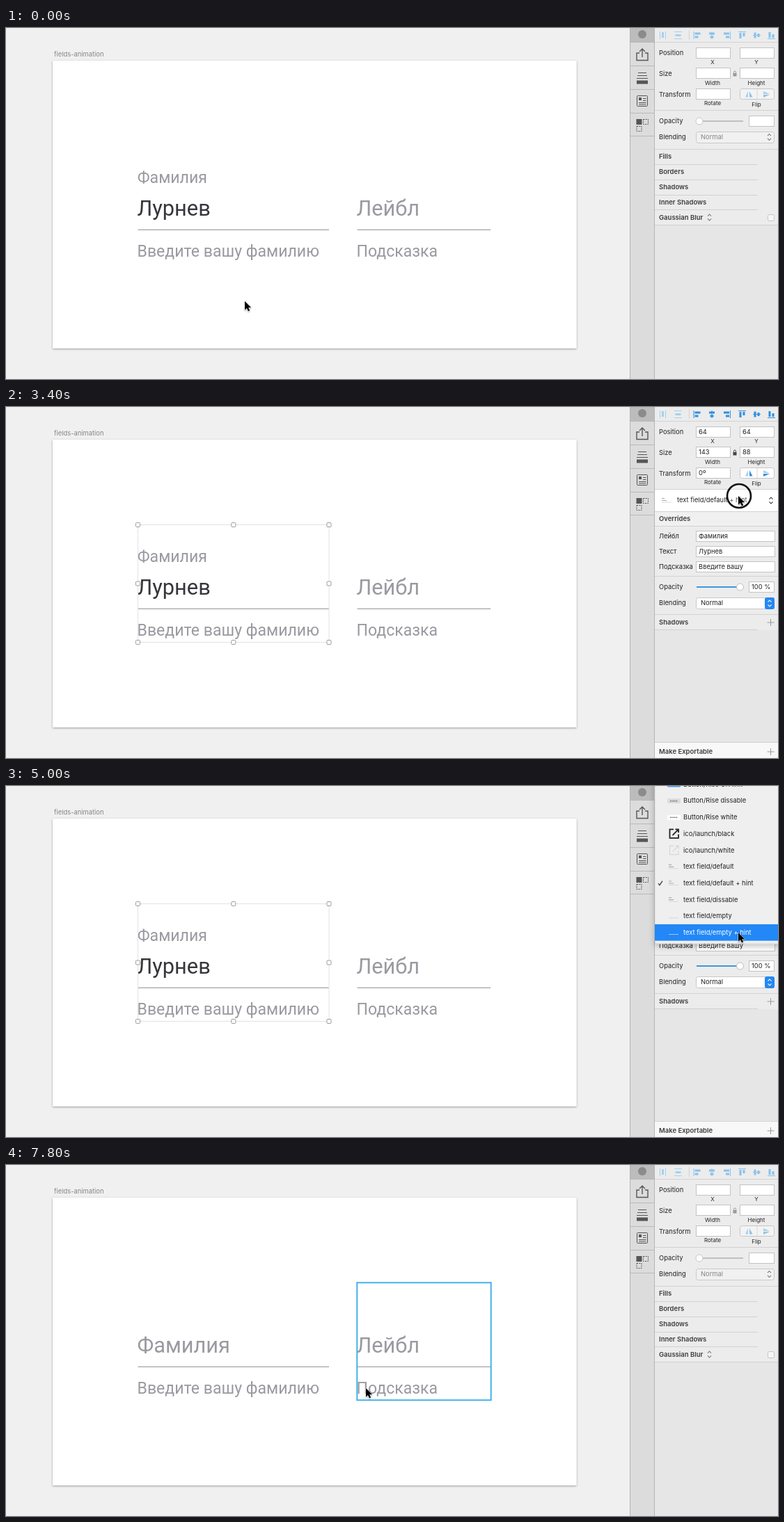
These frames come from a looping animation (1109 px wide and 505 px high, 8800 ms). An HTML page:

```html
<!DOCTYPE html>
<html lang="ru">
<head>
<meta charset="utf-8">
<title>Fields animation</title>
<style>
  html, body { margin: 0; width: 100%; height: 100%; overflow: hidden; background: #f0f0f0; }
  svg { display: block; width: 1109px; height: 505px; }
  text { font-family: Inter, sans-serif; font-size: 9.4px; fill: #222; white-space: pre; }
  .bold { font-weight: 600; font-size: 9.5px; fill: #3c3c3c; }
  .small { font-size: 8px; text-anchor: middle; }
  .field { font-family: Roboto, sans-serif; font-size: 23.08px; fill: #9b99a0; }
  .big { font-size: 30.77px; }
  .dark { fill: #37353b; }
  .white { fill: #fff; }
  .dim { fill: #858585; }
  .state { display: none; }
</style>
</head>
<body>
<svg id="stage" viewBox="0 0 1109 505"></svg>
<script>
const LOOP = 8800;
const SURNAME = 'Лурнев';
const BLUE = '#2f8fe0', PALE = '#a5d1ee';

const rect = (x, y, w, h, fill, stroke = 'none', extra = '') =>
  `<rect x="${x}" y="${y}" width="${w}" height="${h}" fill="${fill}" stroke="${stroke}" ${extra}/>`;
const path = (d, stroke, width = 1, fill = 'none') =>
  `<path d="${d}" stroke="${stroke}" stroke-width="${width}" fill="${fill}"/>`;
const circle = (x, y, r, fill, stroke = 'none', width = 1) =>
  `<circle cx="${x}" cy="${y}" r="${r}" fill="${fill}" stroke="${stroke}" stroke-width="${width}"/>`;
const text = (x, y, str, cls = '') => `<text x="${x}" y="${y}" class="${cls}">${str}</text>`;
const label = (x, mid, str, cls) => text(x, mid + 3.4, str, cls);
const state = (name, body) => `<g class="state" data-state="${name}">${body}</g>`;
const rule = (y, x2 = 1109) => path(`M932 ${y}.5H${x2}`, '#d2d2d2');
const input = (x, y, w, value = '') =>
  rect(x + .5, y + .5, w - 1, 15, '#fff', '#c3c3c3') + label(x + 4, y + 8, value);
const plus = y => path(`M1093.5 ${y}H1103.5M1098.5 ${y - 5}V${y + 5}`, '#9a9a9a');
const chevrons = (x, y, color) =>
  path(`M${x - 2.5} ${y - 1.8}l2.5 -2.7l2.5 2.7M${x - 2.5} ${y + 1.8}l2.5 2.7l2.5 -2.7`, color, 1.1);

// --- Canvas with the artboard -------------------------------------------
function artboard() {
  return rect(67, 47, 752.5, 414, '#fff', 'none', 'filter="url(#lift)"') +
    text(69, 40.5, 'fields-animation', 'dim') +
    path('M189.5 290.3H464M504.5 290.3H696', '#a3a2a6', 1.2) +
    text(188.5, 329, 'Введите вашу фамилию', 'field') +
    text(503.5, 329, 'Подсказка', 'field') +
    text(503.5, 270, 'Лейбл', 'field big') +
    state('filled', text(188.8, 223, 'Фамилия', 'field') + text(188.5, 270, SURNAME, 'field big dark')) +
    state('empty', text(188.5, 270, 'Фамилия', 'field big'));
}

function handles() {
  let out = rect(189.5, 169.5, 274.5, 169, 'none', '#e2e2e2');
  for (const x of [189.5, 326.8, 464])
    for (const y of [169.5, 254, 338.5])
      if (x !== 326.8 || y !== 254)
        out += rect(x - 3, y - 3, 6, 6, '#fff', '#9c9c9c', 'rx="1"');
  return out;
}

const hover = (x, w) => rect(x, 169.3, w, 169, 'none', '#43b1ea', 'stroke-width="2"');

// --- Tool strip ----------------------------------------------------------
function tools() {
  const ink = '#555';
  return rect(897, 0, 35, 505, '#dcdcdc') + rect(897, 0, 35, 20, '#bcbcbc') +
    path('M896.5 0V505M931.5 0V505', '#b4b4b4') +
    [20, 54, 88, 122, 155].map(y => path(`M897 ${y}.5H931`, '#b9b9b9')).join('') +
    circle(914, 9, 6, '#8b8b8b') +
    path('M910 36H906V46.5H922V36H918M914 42V30.5M910 34L914 30L918 34', ink, 1.4) +
    path('M908 64.5H920M907 68.5H921M906 72.5H922', ink, 1.2) + rect(906, 75.5, 16, 5, ink) +
    rect(906.5, 97.5, 15, 15, 'none', ink, 'rx="1"') + rect(909, 100, 4, 4, ink) +
    path('M915 101.5H919.5M915 104.5H919.5M909 107.5H919.5M909 110H919.5', ink) +
    rect(905.5, 131, 8, 8, ink) +
    `<g stroke-dasharray="2 1.3">${rect(915.5, 131.5, 7, 7, 'none', ink) + rect(906, 141.5, 7, 7, 'none', ink)}</g>`;
}

// --- Inspector -----------------------------------------------------------
function alignIcons(color) {
  const bars = (x, y, w, h) => rect(x, y, w, h, color);
  const across = (x, line, a, b) => bars(x + line, 5, 1, 11) + bars(x + a, 6.5, 8, 3) + bars(x + b, 11.5, 5, 3);
  const down = (x, line, a, b) => bars(x - 5, line, 11, 1) + bars(x - 3.5, a, 3, 8) + bars(x + 1.5, b, 3, 5);
  return across(992, -4.5, -2.5, -2.5) + across(1014, -.5, -4, -2.5) + across(1036, 4, -5, -2) +
    down(1057, 5, 7, 7) + down(1078, 10, 6.5, 8) + down(1099, 15, 6, 9);
}

function geometry(on) {
  const v = on ? ['64', '64', '143', '88', '0º'] : Array(5).fill('');
  const lock = on ? '#444' : '#9a9a9a';
  const flip = on ? BLUE : '#8fc3e8';
  return alignIcons(on ? BLUE : '#86c2ec') +
    input(991, 28, 50, v[0]) + input(1054, 28, 50, v[1]) +
    input(991, 57, 50, v[2]) + input(1054, 57, 50, v[3]) + input(991, 87, 50, v[4]) +
    rect(1044.5, 65, 5, 4.5, lock) + path('M1045.5 65V63.5a1.5 1.5 0 0 1 3 0V65', lock) +
    rect(1054.5, 87.5, 49, 15, on ? '#fff' : '#f3f3f3', '#c6c6c6', 'rx="3"') +
    path('M1079 88V102', '#d8d8d8') +
    path('M1066 91V99.5H1062Z', 'none', 0, PALE) + path('M1068 91V99.5H1072.5Z', 'none', 0, flip) +
    path('M1088 91V95H1097Z', 'none', 0, PALE) + path('M1088 96V100L1097 96Z', 'none', 0, flip);
}

function inspector() {
  return rect(932, 0, 177, 505, '#e6e6e6') + rect(932, 0, 177, 119, '#ececec') +
    rule(20) + rect(939, 5, 1, 11, PALE) + rect(942, 6, 3, 8, PALE) + rect(947, 5, 1, 11, PALE) +
    rect(960, 5, 11, 1, PALE) + rect(961.5, 9, 8, 3, PALE) + rect(960, 15, 11, 1, PALE) +
    path('M981.5 3V17', '#d0d0d0') +
    label(938, 36, 'Position') + label(938, 66, 'Size') + label(938, 95.5, 'Transform') +
    [[1015, 52.3, 'X'], [1078, 52.3, 'Y'], [1015, 82, 'Width'], [1078, 82, 'Height'],
     [1015, 110.5, 'Rotate'], [1078, 112.5, 'Flip']].map(a => text(...a, 'small')).join('');
}

function idlePanel() {
  const heads = ['Fills', 'Borders', 'Shadows', 'Inner Shadows', 'Gaussian Blur'];
  return geometry(false) + rect(932, 119, 177, 164, '#ececec') + rule(118) +
    label(938, 134, 'Opacity') + path('M997 134H1059', '#c0c0c0', 2) + circle(996, 134, 5, '#fff', '#c5c5c5') +
    input(1067, 126, 37) + label(938, 157, 'Blending') +
    rect(991.5, 149.5, 112, 16, '#f1f1f1', '#c9c9c9', 'rx="3"') + label(998, 157, 'Normal', 'dim') +
    chevrons(1096.5, 157, '#777') + rule(174) +
    heads.map((name, i) => label(938, 185 + i * 21.9, name, 'bold') +
      rule([196, 218, 240, 261, 283][i], i < 4 ? 1080 : 1109)).join('') +
    chevrons(1010.5, 272.5, '#777') + rect(1094.5, 268.5, 9, 9, '#f6f6f6', '#c4c4c4', 'rx="2"');
}

function symbolRow(name, rows, preview) {
  return preview + label(964, 134, name) +
    rows.map(([key, value], i) => label(938, 186 + i * 22, key) + input(991, 178 + i * 22, 114, value)).join('');
}

function selectedPanel() {
  return geometry(true) + rect(932, 119, 177, 31, '#fff') + rule(118) + rule(150) +
    rect(932, 151, 177, 20, '#f0f0f0') + rect(932, 171, 177, 150, '#ececec') + rule(171) +
    chevrons(1099, 134.5, '#333') + label(938, 161, 'Overrides', 'bold') + rule(243) +
    label(938, 259, 'Opacity') + path('M992 259H1054', '#4197df', 2) + circle(1054.5, 259, 5, '#fff', '#bdbdbd') +
    input(1067, 251, 37, '100 %') + label(938, 282, 'Blending') +
    rect(991.5, 274.5, 112, 16, '#fff', '#c6c6c6', 'rx="3"') + label(998, 282, 'Normal') +
    rect(1090, 274, 14, 17, '#2488f2', 'none', 'rx="3"') + chevrons(1097, 282.5, '#fff') +
    rule(298) + label(938, 310, 'Shadows', 'bold') + plus(310) + rule(320, 1080) +
    rect(932, 483, 177, 22, '#f8f8f8') + rule(482) + label(938, 496, 'Make Exportable', 'bold') + plus(496);
}

const fieldPreview = (x, y, full, color = '#aaa') =>
  (full ? path(`M${x} ${y - 2.5}h4M${x} ${y + .5}h7`, color, 1.2) : '') +
  path(`M${x} ${y + 3}h14`, '#d3d3d3', .8);

// --- Symbol menu ---------------------------------------------------------
const ITEMS = ['Button/Rise OK link', 'Button/Rise dissable', 'Button/Rise white', 'ico/launch/black',
  'ico/launch/white', 'text field/default', 'text field/default + hint', 'text field/dissable',
  'text field/empty', 'text field/empty + hint'];
const rowY = i => -2.6 + i * 23.68;

function thumb(i) {
  const y = rowY(i);
  if (i < 3) return rect(950, y - 3, 19, 7, ['#4b9be6', '#dcdcdc', '#fff'][i], 'none', 'rx="1"') +
    (i ? path(`M954 ${y + .5}h11`, '#888', 1.6).replace('/>', ' stroke-dasharray="2 .6"/>') : '');
  if (i < 5) {
    const ink = i === 3 ? '#222' : '#d6d6d6';
    return path(`M959 ${y - 6}h-5.5v12.5h12.5v-5.5M961.5 ${y - 6}h4.5v4.5M966 ${y - 6}l-8.5 8.5`, ink, i === 3 ? 1.8 : 1.1);
  }
  return fieldPreview(952, y, i < 8);
}

function menu() {
  const shape = 'M1115 -10V227H936a4 4 0 0 1 -4 -4V-10Z';
  return `<g filter="url(#drop)">${path(shape, '#c4c4c4', .6, '#efefef')}</g>` +
    ITEMS.map((name, i) => thumb(i) + label(973, rowY(i), name)).join('') +
    path('M937 140l2 2.6l4 -6', '#333', 1.2) +
    [6, 7, 8, 9].map(i => state('row' + i,
      rect(932, rowY(i) - 11.6, 177, 23.68, '#2287f7') + fieldPreview(952, rowY(i), i < 8, '#5c8fc8') +
      (i === 6 ? path('M937 140l2 2.6l4 -6', '#fff', 1.2) : '') +
      label(973, rowY(i), ITEMS[i], 'white'))).join('');
}

const pointer = `<g id="pointer">
  ${state('ring', circle(1, 0, 17, 'rgba(255,255,255,.25)', '#111', 2.6))}
  <path d="M0 0V12.8L2.9 10.1L5 14.6L7.2 13.6L5.2 9.2H9.2Z" fill="#000" stroke="#fff" stroke-width="1"
    paint-order="stroke" filter="url(#soft)"/></g>`;

const shadow = (id, dy, blur, alpha) =>
  `<filter id="${id}" x="-20%" y="-20%" width="140%" height="150%">
    <feDropShadow dx="0" dy="${dy}" stdDeviation="${blur}" flood-opacity="${alpha}"/></filter>`;

const stage = document.getElementById('stage');
stage.innerHTML = `<defs>${shadow('lift', 1, 1.5, .35) + shadow('drop', 3, 5, .25) + shadow('soft', 1, .8, .35)}</defs>` +
  rect(0, 0, 1109, 505, '#f0f0f0') + artboard() +
  state('hoverA', hover(189.5, 275)) + state('hoverB', hover(504.3, 192.4)) + state('handles', handles()) +
  tools() + inspector() + state('idle', idlePanel()) + state('selected', selectedPanel()) +
  state('before', symbolRow('text field/default + hint',
    [['Лейбл', 'Фамилия'], ['Текст', SURNAME], ['Подсказка', 'Введите вашу']], fieldPreview(942, 134, true))) +
  state('after', symbolRow('text field/empty + hint',
    [['Текст', SURNAME], ['Лейбл', 'Фамилия'], ['Подсказка', 'Введите вашу']], fieldPreview(942, 136, false))) +
  state('menu', menu()) + pointer;

// --- Timeline: start time, pointer position, visible states ---------------
const START = 'idle filled', PICKED = 'selected handles filled before', OPEN = PICKED + ' menu ';
const CHANGED = 'selected handles empty after', END = 'idle empty';
const STEPS = [
  [0, 343, 393, START],
  [200, 341, 352, START],
  [400, 336, 304, START + ' hoverA'],
  [600, 335, 292, START + ' hoverA ring'],
  [800, 335, 292, PICKED],
  [1000, 390, 270, PICKED],
  [1200, 512, 232, PICKED],
  [1400, 800, 164, PICKED],
  [1600, 1010, 132, PICKED],
  [1800, 1052, 127.5, PICKED],
  [3400, 1052, 128, PICKED + ' ring'],
  [3600, 1052, 128, OPEN + 'row6'],
  [4200, 1056, 138, OPEN + 'row6'],
  [4400, 1060, 152, OPEN + 'row7'],
  [4600, 1058, 182, OPEN + 'row8'],
  [4800, 1053, 208, OPEN + 'row9'],
  [5000, 1052, 211, OPEN + 'row9'],
  [6200, 1052, 211, OPEN + 'row9 ring'],
  [6400, 1025, 228, CHANGED],
  [6600, 770, 324, CHANGED],
  [6800, 631, 363, CHANGED],
  [7000, 631, 363, CHANGED + ' ring'],
  [7200, 631, 363, END],
  [7400, 604, 353, END],
  [7600, 542, 330, END + ' hoverB'],
  [7800, 517, 321, END + ' hoverB'],
];

const groups = [...document.querySelectorAll('[data-state]')];
const pointerNode = document.getElementById('pointer');
const origin = performance.now();
let current;

function draw(now) {
  const t = Math.max(0, now - origin) % LOOP;
  const step = STEPS.findLast(s => s[0] <= t);
  if (step !== current) {
    current = step;
    const [, x, y, names] = step;
    const shown = new Set(names.split(' '));
    for (const g of groups) g.style.display = shown.has(g.dataset.state) ? 'inline' : 'none';
    pointerNode.setAttribute('transform', `translate(${x} ${y})`);
  }
  requestAnimationFrame(draw);
}
draw(origin);
</script>
</body>
</html>
```
